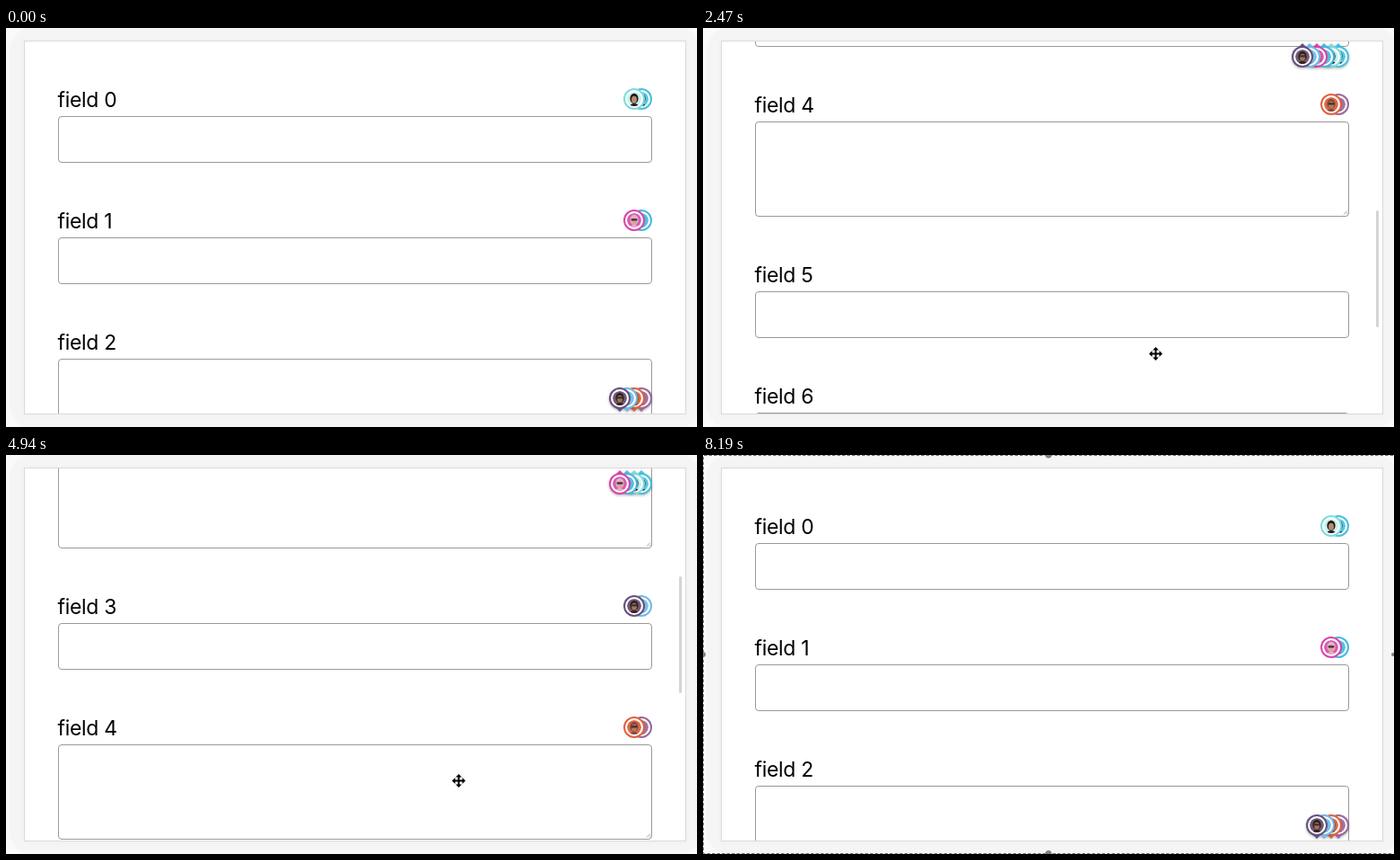
Recreate the animation shown at these times as an HTML page. Size 770 px wide and 444 px high, loop 8.97 s.

```html
<!DOCTYPE html>
<html lang="en">
<head>
<meta charset="utf-8">
<title>Form presence</title>
<style>
  html, body { margin: 0; width: 100%; height: 100%; overflow: hidden; background: #fafafa; }
  svg { display: block; }
  text { font: 23px Inter, Roboto, sans-serif; letter-spacing: -0.3px; fill: #000; }
  .box { fill: #fff; stroke: #999; }
  .grip { stroke: #888; stroke-width: .8; }
  .docked { filter: drop-shadow(0 1px 1.5px rgba(0, 0, 0, .3)); }
  .tip { display: none; }
  .docked .tip { display: inline; }
</style>
</head>
<body>
<svg id="stage" width="770" height="444" viewBox="0 0 770 444">
  <defs>
    <clipPath id="view"><rect x="21" y="15" width="736" height="414"/></clipPath>
    <clipPath id="disc"><circle r="8"/></clipPath>
  </defs>
  <rect x="4" y="-1" width="770" height="446" rx="26" fill="#f5f5f5"/>
  <rect x="17" y="11" width="744" height="422" rx="6" fill="#f3f3f3"/>
  <rect x="20.5" y="14.5" width="737" height="415" fill="#fff" stroke="#dadada"/>
  <g clip-path="url(#view)">
    <g id="form"></g>
    <g id="people"></g>
    <rect id="thumb" x="750" y="19" width="3" height="130" rx="1.5"/>
  </g>
  <g id="select" fill="#808080">
    <path d="M769 .5H.5V443.5H769" fill="none" stroke="#fff"/>
    <path d="M769 .5H.5V443.5H769" fill="none" stroke="#777" stroke-dasharray="3.5 2"/>
    <circle cx="385" cy="0" r="3.5"/>
    <circle cx="385" cy="443.5" r="3.5"/>
    <circle cx="0" cy="222" r="3"/>
    <circle cx="769" cy="222" r="2"/>
  </g>
  <path id="cursor" stroke="#fff" stroke-width="1.4" paint-order="stroke" stroke-linejoin="round"
    d="M0-7.5L3.4-4H1V-1H4V-3.4L7.5 0L4 3.4V1H1V4H3.4L0 7.5L-3.4 4H-1V1H-4V3.4L-7.5 0L-4-3.4V-1H-1V-4H-3.4Z"/>
</svg>
<script>
const LOOP = 8970, STEP = 130;
const TOP = 32, BOTTOM = 412, NEAR = 24;
const $ = id => document.getElementById(id);

// time, scroll position
const scrollKeys = [
  [1170, 0], [1300, 12], [1430, 60], [1690, 260], [1820, 365], [1950, 439], [2080, 485],
  [2340, 545], [2470, 588], [2730, 780], [2860, 850], [2990, 881],
  [3250, 881], [3380, 878], [3510, 871], [3640, 858], [4160, 640], [4680, 470],
  [4940, 370], [5200, 160], [5460, 0]
];
// time, x, y
const cursorKeys = [[780, 442, 325], [910, 482, 350], [1040, 504.5, 362.5],
  [7930, 504.5, 362.5], [8060, 496, 430]];

function sample(keys, t) {
  if (t <= keys[0][0]) return keys[0].slice(1);
  const i = keys.findIndex(k => k[0] >= t);
  if (i < 0) return keys[keys.length - 1].slice(1);
  const a = keys[i - 1], b = keys[i], p = (t - a[0]) / (b[0] - a[0]);
  return a.slice(1).map((v, j) => v + (b[j + 1] - v) * p);
}

// Every third field or so is a tall text area.
const tall = new Set([2, 4, 7]);
const fieldTop = [];
let form = '';
for (let i = 0, y = 98; i < 8; i++) {
  const h = tall.has(i) ? 106 : 52;
  fieldTop.push(y);
  form += `<text x="57.5" y="${y - 10}">field ${i}</text>
    <rect class="box" x="58.5" y="${y + .5}" width="661" height="${h - 1}" rx="3.5"/>`;
  if (tall.has(i)) form += `<path class="grip" d="M714 ${y + h - 2.5}l4-4M717 ${y + h - 2.5}l1.5-1.5"/>`;
  y += h + 83;
}
$('form').innerHTML = form;

function avatar(dx, { ring, back, hair, skin, shades }) {
  return `<g transform="translate(${dx} 0)">
    <path class="tip" d="M-6-9L0-15L6-9Z" fill="${ring}"/>
    <circle r="12" fill="${ring}"/><circle r="10" fill="#fff"/>
    <g clip-path="url(#disc)">
      <circle r="8" fill="${back}"/>
      <ellipse cy="-.5" rx="4.6" ry="5.8" fill="${hair}"/>
      <ellipse cy="9" rx="5.5" ry="4" fill="${hair}"/>
      <ellipse cy=".8" rx="3" ry="4" fill="${skin}"/>
      ${shades ? '<rect x="-3.5" y="-1.8" width="7" height="2.4" rx="1" fill="#3a3034"/>' : ''}
    </g></g>`;
}

const look = (ring, back, hair, skin, shades) => ({ ring, back, hair, skin, shades });
const pairs = [
  [0, look('#7fdbdc', '#c9f1ec', '#1d1a1c', '#b98a72'), look('#45c0e0', '#58c4e2', '#23363e', '#a97c66')],
  [1, look('#d846a8', '#d65cb0', '#e6b0c8', '#d9a59a', true), look('#44b9e0', '#52bfe4', '#4eb3d8', '#6fc0dc')],
  [3, look('#66507f', '#6f5a74', '#2c2224', '#a87350', true), look('#72b9e6', '#7cc0ea', '#6fb0dc', '#90c8ea')],
  [4, look('#e0623c', '#dd6a48', '#8a4a38', '#b57a5c', true), look('#99699c', '#a173a6', '#8d6092', '#a880a8')]
].map(([field, front, behind]) => {
  const el = document.createElementNS('http://www.w3.org/2000/svg', 'g');
  el.innerHTML = `<g>${avatar(8, behind)}${avatar(0, front)}</g>`;
  return { el, y: fieldTop[field] - 19 };
});

const clamp = (v, lo, hi) => Math.min(hi, Math.max(lo, v));

function placePeople(scroll) {
  const list = pairs.map((p, i) => {
    const y = p.y - scroll;
    const up = clamp((TOP + NEAR - y) / NEAR, 0, 1);
    const down = clamp((y - BOTTOM + NEAR) / NEAR, 0, 1);
    const x = 700 - 16 * (i * up + (pairs.length - 1 - i) * down);
    return { el: p.el, x, y: clamp(y, TOP, BOTTOM), up, down };
  });
  // The leftmost pair lies on top of its stack.
  list.sort((a, b) => b.x - a.x).forEach(({ el, x, y, up, down }) => {
    el.setAttribute('transform', `translate(${x} ${y})`);
    el.firstChild.setAttribute('class', up > .5 || down > .5 ? 'docked' : '');
    el.querySelectorAll('.tip').forEach(tip =>
      tip.setAttribute('transform', down > .5 ? 'scale(1 -1)' : ''));
    $('people').append(el);
  });
}

function draw(t) {
  const [scroll] = sample(scrollKeys, t);
  $('form').setAttribute('transform', `translate(0 ${-Math.round(scroll)})`);
  placePeople(Math.round(scroll));

  const thumb = $('thumb');
  thumb.setAttribute('y', 19 + Math.round(scroll * .3135));
  thumb.setAttribute('fill', t < 5850 ? '#d4d4d4' : '#f3f3f3');
  thumb.style.display = t >= 1300 && t < 7410 ? '' : 'none';

  const [x, y] = sample(cursorKeys, t);
  const size = t >= 7020 && t < 7150 ? 1.35 : 1;
  $('cursor').setAttribute('transform', `translate(${x} ${y}) scale(${size})`);
  $('cursor').style.display = t >= 780 && t < 8190 ? '' : 'none';

  $('select').style.opacity = t < 7410 ? 0 : t < 7540 ? .5 : 1;
}

const start = performance.now();
let last = -1;
function tick() {
  const t = Math.floor((performance.now() - start) % LOOP / STEP) * STEP;
  if (t !== last) draw(last = t);
  requestAnimationFrame(tick);
}
tick();
</script>
</body>
</html>
```
